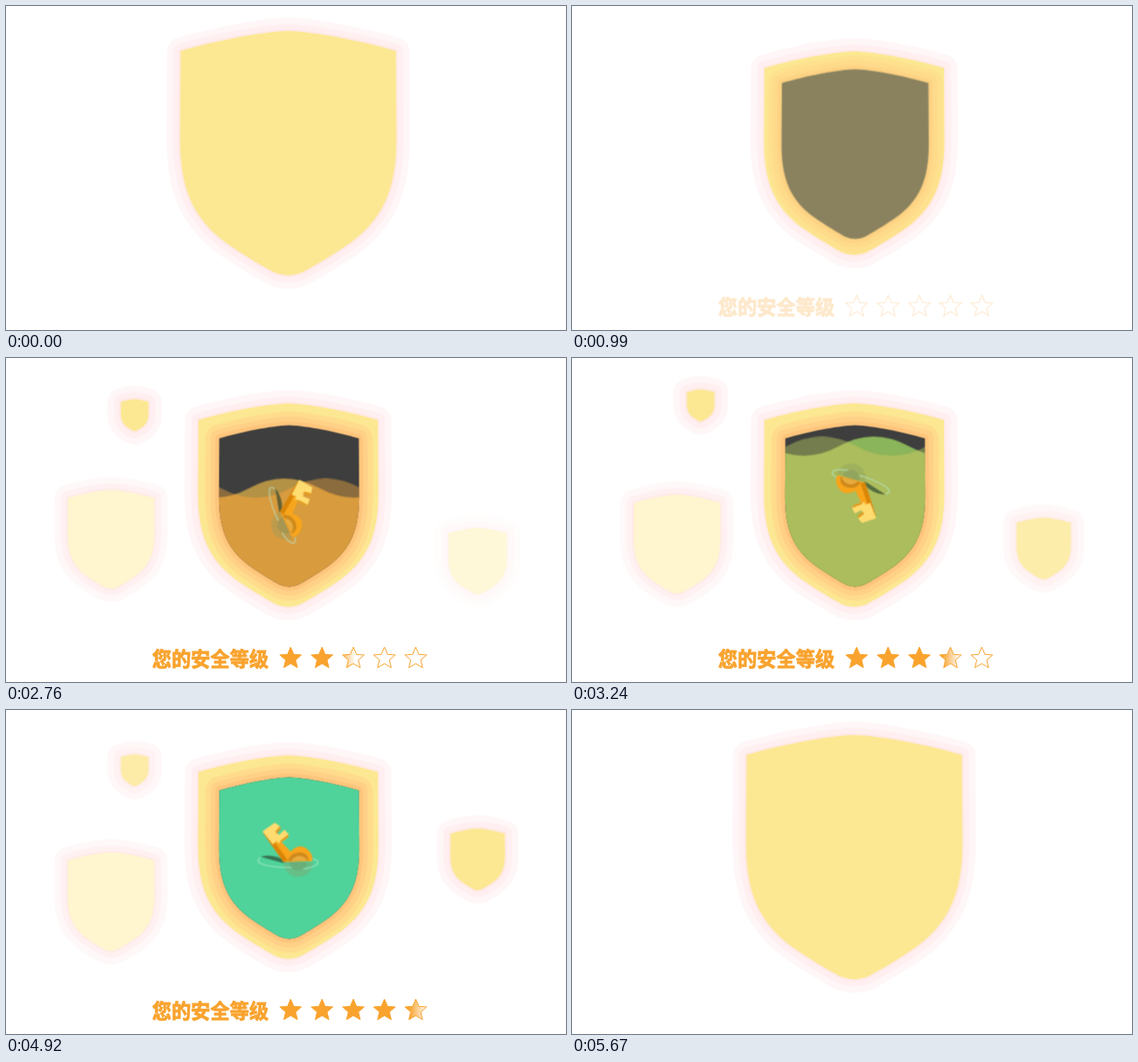
Recreate the animation shown at these times as an HTML page without scripts. Size 640 px wide and 371 px high, loop 5.77 s.

```html
<!DOCTYPE html>
<html lang="zh">
<head>
<meta charset="utf-8">
<title>Security level</title>
<style>
html, body { margin: 0; width: 100%; height: 100%; overflow: hidden; background: #fff; }
svg { display: block; width: 100vw; height: 100vh; }

.zoom, .rest, .inner, .pop, .float, .level, .wave, .tone, .tint, .key, .spin, .label, .front {
  animation: 5770ms linear infinite;
}
#shape { vector-effect: non-scaling-stroke; }
.halo { fill: none; stroke-linejoin: round; }
text { font: 900 22.2px "Noto Sans CJK SC", "Noto Sans CJK", sans-serif; }

.zoom { animation-name: zoom; }
@keyframes zoom {
  0%, 1.73% { transform: scale(1.2); }
  17.2%, 93.59% { transform: scale(1); }
  98.2%, 100% { transform: scale(1.2); }
}
.rest { animation-name: rest; }
@keyframes rest { 0%, 93.59% { opacity: 1; } 98.2%, 100% { opacity: 0; } }
.inner { animation-name: inner; }
@keyframes inner {
  0%, 11.96% { opacity: 0; transform: scale(1.125); }
  20.62%, 100% { opacity: 1; transform: scale(1); }
}
.label { animation-name: label; }
@keyframes label {
  0%, 15.08% { opacity: 0; }
  23.4% { opacity: 1; }
  91.5% { opacity: 1; transform: translateY(0); }
  93.59%, 100% { opacity: 1; transform: translateY(5px); }
}

/* small shields */
.pop.a { animation-name: popA; }
@keyframes popA {
  0%, 24.26% { opacity: 0; transform: scale(1.15); }
  31.2%, 57.19% { opacity: 1; transform: scale(1); }
  71.75%, 100% { opacity: .8; transform: scale(1); }
}
.pop.b { animation-name: popB; stroke-opacity: .75; }
@keyframes popB {
  0%, 34.66% { opacity: 0; transform: scale(1.13); }
  41.6%, 100% { opacity: 1; transform: scale(1); }
}
.pop.c { animation-name: popC; }
@keyframes popC {
  0%, 45.06% { opacity: 0; transform: scale(1.15); }
  51.1%, 56.15% { opacity: .78; transform: scale(1); }
  71.75%, 100% { opacity: 1; transform: scale(1); }
}
.float.a { animation-name: floatA; }
@keyframes floatA {
  0%, 15.6% { transform: translate(147px, 52.5px); animation-timing-function: cubic-bezier(.33,.67,.67,1); }
  36.4% { transform: translate(147px, 71px); animation-timing-function: cubic-bezier(.33,0,.67,.33); }
  57.19% { transform: translate(147px, 52.5px); animation-timing-function: cubic-bezier(.33,.67,.67,1); }
  77.99% { transform: translate(147px, 71px); animation-timing-function: cubic-bezier(.33,0,.67,.33); }
  100% { transform: translate(147px, 52.5px); }
}
.float.b { animation-name: floatB; }
@keyframes floatB {
  0%, 36.4% { transform: translate(120px, 197.5px); animation-timing-function: cubic-bezier(.33,.67,.67,1); }
  79.72%, 100% { transform: translate(120px, 219.5px); }
}
.float.c { animation-name: floatC; }
@keyframes floatC {
  0%, 45.06% { transform: translate(539px, 233.5px); animation-timing-function: cubic-bezier(.33,0,.67,.33); }
  72.79% { transform: translate(539px, 137px); animation-timing-function: cubic-bezier(.33,.4,.67,.8); }
  85.27% { transform: translate(539px, 171px); animation-timing-function: cubic-bezier(.33,.45,.67,.85); }
  100% { transform: translate(539px, 196px); }
}

/* rising water */
.level { animation-name: level; }
@keyframes level {
  0%, 26% { transform: translateY(275px); }
  62.39%, 100% { transform: translateY(65px); }
}
.wave { animation-name: wave; }
.wave.a { animation-duration: 961.667ms; }
.wave.b { animation-duration: 2885ms; }
@keyframes wave { to { transform: translateX(160px); } }
.tone { animation-name: tone; }
@keyframes tone {
  0%, 37.95% { fill: #cf4d30; }
  49% { fill: #d9a440; }
  56.15% { fill: #abbd5c; }
  67.59%, 100% { fill: #4fd39a; }
}
.tint { animation-name: tint; }
@keyframes tint {
  0%, 37.95% { fill: #c94c30; }
  49% { fill: #b09a48; }
  56.15% { fill: #8bb55a; }
  67.59%, 100% { fill: #4fd39a; }
}

/* key */
.key { animation-name: key; }
@keyframes key {
  0%, 26% { transform: translate(322px, 305px); }
  37.95% { transform: translate(322px, 224px); }
  50.26% { transform: translate(326px, 164px); animation-timing-function: ease-out; }
  56.15% { transform: translate(327px, 152px); animation-timing-function: ease-in-out; }
  71.75% { transform: translate(326px, 165px); }
  85.27%, 100% { transform: translate(322px, 163px); }
}
.spin { animation-name: spin; }
@keyframes spin {
  0%, 26% { transform: rotate(-630deg); }
  37.95% { transform: rotate(-451deg); }
  56.15% { transform: rotate(-163deg); }
  71.75% { transform: rotate(-74deg); }
  85.27% { transform: rotate(0deg); }
  100% { transform: rotate(80deg); }
}

/* star filling */
.front { animation-name: front; }
@keyframes front {
  0%, 26% { transform: translateX(311px); }
  37.95% { transform: translateX(347px); }
  56.15% { transform: translateX(443px); }
  71.75% { transform: translateX(466px); }
  85.27% { transform: translateX(481px); }
  91.85%, 100% { transform: translateX(502px); }
}
</style>
</head>
<body>
<svg viewBox="0 0 640 371" preserveAspectRatio="none">
  <defs>
    <path id="shape" d="M-102.5-97.5C-70-107-27-115.5 0-116.5C27-115.5 70-107 102.5-97.5L103-15C103 25 96 58 60 85C40 99 22 109 14 113.5Q0 119.5-14 113.5C-22 109-40 99-60 85C-96 58-103 25-103-15Z"/>
    <g id="shield">
      <g class="halo">
        <use href="#shape" stroke="#fff6f7" stroke-width="31"/>
        <use href="#shape" stroke="#ffeff0" stroke-width="16"/>
        <use href="#shape" stroke="#ffe9e4" stroke-width="4"/>
      </g>
      <use href="#shape" stroke="none"/>
    </g>
    <path id="star" d="M0-13L3.6-4.6 12.4-4 5.7 1.8 7.8 10.6 0 5.9-7.8 10.6-5.7 1.8-12.4-4-3.6-4.6Z"/>
    <g id="stars">
      <use href="#star" x="325.3" y="344"/>
      <use href="#star" x="361.2" y="344"/>
      <use href="#star" x="397" y="344"/>
      <use href="#star" x="432.5" y="344"/>
      <use href="#star" x="468.3" y="344"/>
    </g>
    <path id="waveA" d="M26 0q40-22 80 0t80 0t80 0t80 0t80 0t80 0V340H26Z"/>
    <clipPath id="inside"><use href="#shape" transform="scale(.778 .794)"/></clipPath>
    <clipPath id="underB"><path class="wave b" d="M-35 0q40-22 80 0t80 0t80 0t80 0t80 0t80 0V340H-35Z"/></clipPath>
    <linearGradient id="edge">
      <stop offset=".9" stop-color="#fff"/>
      <stop offset="1" stop-color="#fff" stop-opacity="0"/>
    </linearGradient>
    <mask id="filled" maskUnits="userSpaceOnUse" x="300" y="320" width="200" height="50">
      <rect class="front" x="-200" y="320" width="200" height="50" fill="url(#edge)"/>
    </mask>
  </defs>

  <g transform="translate(322.5 168.5)"><g class="zoom"><g transform="translate(-322.5 -168.5)">
    <use href="#shield" transform="translate(322.5 168.5)" fill="#fce892"/>

    <g class="rest">
      <g transform="translate(323.5 169.5)"><g class="inner">
        <g class="halo" transform="scale(.778 .794)">
          <use href="#shape" stroke="#ffdc8d" stroke-width="32"/>
          <use href="#shape" stroke="#ffd188" stroke-width="20"/>
          <use href="#shape" stroke="#ffc57c" stroke-width="9"/>
        </g>

        <g clip-path="url(#inside)"><g transform="translate(-323.5 -169.5)">
          <rect x="200" y="50" width="250" height="250" fill="#3e3e3e"/>
          <g class="level">
            <g class="tone" opacity=".5"><use class="wave a" href="#waveA"/></g>
            <g clip-path="url(#underB)">
              <rect class="tint" x="200" y="-20" width="250" height="360"/>
              <g class="tone"><use class="wave a" href="#waveA"/></g>
            </g>
          </g>
          <g class="key"><g class="spin">
            <path d="M-31 5Q-15 1-2 11L-6 12Z" fill="#26402c" opacity=".65"/>
            <path d="M-5 11A17 17 0 0 0 29 11Z" fill="#8d9a62" opacity=".35"/>
            <path d="M2 11A10 10 0 0 0 22 11Z" fill="#6f8a60" opacity=".3"/>
            <path d="M-31 6Q-40 11-24 15Q-8 18 4 17M29 7Q41 12 27 17L18 19" fill="none" stroke="#b8ecd6" stroke-width="1.6" opacity=".55"/>
            <path d="M-28-22L-16-13-8-13 3-1Q15-13 25-1Q29 4 28 10L-5 11Z" fill="#f8a51c"/>
            <path d="M-28-22L-5 11 0 9-24-24Z" fill="#d98508"/>
            <path d="M0 10Q3 0 13 0T24 9Z" fill="#cf8a1c"/>
            <path d="M4 10Q8 3 14 4T22 9Z" fill="#e9ab3f"/>
            <path d="M-29-24L-15-34-9-30-14-24-10-20-4-26 1-21 0-17-10-10-13-13-17-9Z" fill="#ffdc70"/>
            <path d="M1-21L0-17-10-10-8-14ZM-9-30L-14-24-13-21-8-27Z" fill="#e39a1b"/>
          </g></g>
        </g></g>
      </g></g>

      <g class="float a"><g class="pop a"><use href="#shield" transform="scale(.153 .156)" fill="#fce892"/></g></g>
      <g class="float b"><g class="pop b"><use href="#shield" transform="scale(.48 .485)" fill="#fff6cf"/></g></g>
      <g class="float c"><g class="pop c"><use href="#shield" transform="scale(.302)" fill="#fce892"/></g></g>

      <g class="label" fill="#f9a32e" stroke="#f9a32e">
        <text x="167" y="352.6" stroke-width=".8">您的安全等级</text>
        <use href="#stars" fill="none" stroke-width="1"/>
        <g mask="url(#filled)" stroke="none"><use href="#stars"/></g>
      </g>
    </g>
  </g></g></g>
</svg>
</body>
</html>
```
